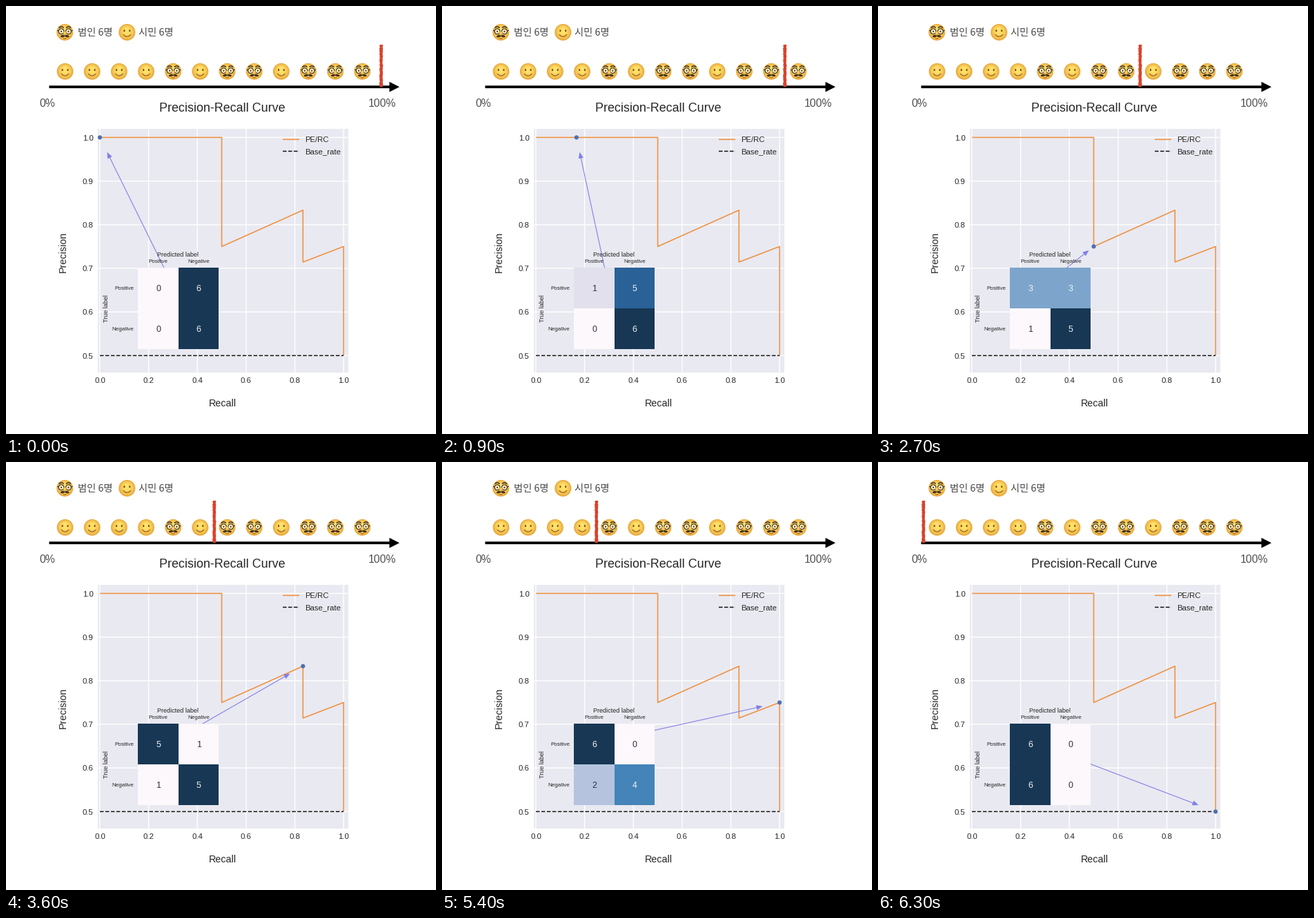
Recreate the animation shown at these times as a matplotlib script. Size 623 px wide and 620 px high, loop 7.2 s.

```python
import numpy as np
import matplotlib.pyplot as plt
from matplotlib.animation import FuncAnimation
from matplotlib.patches import Circle, Ellipse, Polygon, Rectangle

W, H, DPI = 623, 620, 100
PT = 72 / DPI
INK = "#262626"
SANS, HANGUL = "Liberation Sans", "Noto Sans CJK JP"

# True = culprit, False = citizen, sorted by score from 0% to 100%
FACES = [c == "C" for c in "SSSSCSCCSCCC"]
FACE_X, FACE_GAP, FACE_Y = 85.6, 39.15, 94.8
# number of faces left of the threshold, one entry per step
CUTS = [12, 11, 9, 8, 6, 5, 4, 0]
STEP_MS = 900

CELL_X, CELL_Y = (191, 250, 308.3), (379.3, 438, 496.5)
SHADES = np.array([
    (253, 248, 252), (226, 224, 236), (181, 195, 222), (125, 165, 203),
    (68, 132, 184), (42, 97, 150), (23, 55, 84)]) / 255

fig = plt.figure(figsize=(W / DPI, H / DPI), dpi=DPI, facecolor="white")
ax = fig.add_axes([0, 0, 1, 1])
ax.set_xlim(0, W)
ax.set_ylim(H, 0)
ax.axis("off")


def px(recall):
    return 136 + 353.1 * recall


def py(precision):
    return 190.4 + 632 * (1 - precision)


def label(x, y, text, size, ha="center", color=INK, font=SANS, z=6):
    """Text whose capitals are centred on y."""
    return ax.text(x, y + 0.36 * size, text, fontsize=size * PT, ha=ha,
                   va="baseline", color=color, family=font, zorder=z)


def side_label(x, y, text, size):
    ax.text(x, y, text, fontsize=size * PT, ha="center", va="center",
            rotation=90, color=INK, family=SANS, zorder=6)


def line(xs, ys, color, width, z, cap="butt", **kw):
    ax.plot(xs, ys, color=color, lw=width * PT, zorder=z, snap=False,
            solid_capstyle=cap, solid_joinstyle="round", **kw)


def dashed(xs, y):
    line(xs, (y, y), "#111111", 1.5, 4, dashes=(3.7, 1.6))


def oval(x, y, w, h, color, z=4, **kw):
    ax.add_patch(Ellipse((x, y), w, h, fc=color, lw=0, zorder=z, **kw))


def head(x, y, r):
    rim, core = np.array((232, 164, 56)), np.array((255, 224, 104))
    for t in np.linspace(0, 1, 9):
        color = (rim + (core - rim) * t ** 0.6) / 255
        ax.add_patch(Circle((x, y - 2.2 * t), r * (1 - 0.65 * t),
                            fc=color, lw=0, zorder=3))


def citizen(x, y, r):
    head(x, y, r)
    k = r / 12
    for side in (-1, 1):
        oval(x + side * 3.9 * k, y - 2.2 * k, 2.3 * k, 3.2 * k, "#75501c")
    u = np.linspace(-1, 1, 21)
    line(x + 5.4 * k * u, y + (3.4 + 2.9 * (1 - u ** 2)) * k, "#8a5a1c",
         1.15 * k, 4, cap="round")


def culprit(x, y, r):
    head(x, y, r)
    k = r / 12
    u = np.linspace(-1, 1, 15)
    for side in (-1, 1):
        cx = x + side * 5.2 * k
        line(cx + 3 * k * u, y - (6.7 + 1.3 * (1 - u ** 2)) * k, "#4a3a26",
             1.7 * k, 5, cap="round")
        ax.add_patch(Circle((cx, y - 1.2 * k), 3.9 * k, fc="#f8ebbd",
                            ec="#2f2822", lw=1.1 * k * PT, zorder=4))
        oval(cx, y - 1.1 * k, 1.9 * k, 2.6 * k, "#4f3818", 5)
        line((x + side * 9.1 * k, x + side * 11.2 * k),
             (y - 2 * k, y - 2.6 * k), "#2f2822", 1.1 * k, 4)
        oval(x + side * 3 * k, y + 5.6 * k, 6.8 * k, 3.4 * k, "#443422", 5,
             angle=side * 14)
    oval(x, y + 1.6 * k, 5 * k, 6.2 * k, "#e9a63c", 6)
    oval(x, y + 1.2 * k, 3.2 * k, 4.4 * k, "#f8cb62", 6)
    line(x + 2.4 * k * u, y + (8.5 + 0.7 * (1 - u ** 2)) * k, "#8a5a1c",
         0.9 * k, 5)


def draw_scale():
    culprit(85.3, 38, 12)
    citizen(175.3, 38, 12)
    for x, text in ((104, "범인 6명"), (192.5, "시민 6명")):
        label(x, 38, text, 14.3, "left", "#484848", HANGUL)
    for i, guilty in enumerate(FACES):
        (culprit if guilty else citizen)(FACE_X + FACE_GAP * i, FACE_Y, 11.9)
    line((62.5, 558), (117.2, 117.2), "black", 3.8, 2)
    ax.add_patch(Polygon([(555.5, 109.8), (570, 117.2), (555.5, 124.6)],
                         fc="black", lw=0, zorder=2))
    label(59.8, 140.3, "0%", 15.7, color="#505050")
    label(544.5, 140.3, "100%", 15.7, color="#505050")


def draw_chart():
    ax.add_patch(Rectangle((132.5, 178), 363, 353, fc="#e9e9f1", lw=0,
                           zorder=1))
    for v in np.arange(0, 1.01, 0.2):
        line((px(v), px(v)), (178, 531), "white", 1.4, 2)
        label(px(v), 541.8, f"{v:.1f}", 11.4)
    for v in np.arange(0.5, 1.01, 0.1):
        line((132.5, 495.5), (py(v), py(v)), "white", 1.4, 2)
        label(126.5, py(v), f"{v:.1f}", 11.4, "right")
    label(313.7, 146.7, "Precision-Recall Curve", 17.9)
    label(314, 574.7, "Recall", 14.4)
    side_label(83.2, 356.3, "Precision", 14.4)

    curve = np.array([(0, 1), (1 / 2, 1), (1 / 2, 3 / 4), (5 / 6, 5 / 6),
                      (5 / 6, 5 / 7), (1, 3 / 4), (1, 1 / 2)])
    line(px(curve[:, 0]), py(curve[:, 1]), "#ee9140", 1.6, 3)
    dashed((px(0), px(1)), py(0.5))
    line((401, 425), (193.3, 193.3), "#ee9140", 1.6, 3)
    dashed((401, 425), 210.4)
    label(433, 193.3, "PE/RC", 11.4, "left")
    label(433, 210, "Base_rate", 11.4, "left")


def draw_matrix_labels():
    label(249.2, 360, "Predicted label", 9)
    side_label(145.5, 438.2, "True label", 9)
    for i, text in enumerate(("Positive", "Negative")):
        label((220, 279)[i], 369.5, text, 8)
        label(185.2, (408.5, 467.3)[i], text, 8, "right")


def shade(t):
    stops = np.linspace(0, 1, len(SHADES))
    return [np.interp(t, stops, SHADES[:, c]) for c in range(3)]


def chalk_outline():
    rng = np.random.default_rng(4)
    ys = np.linspace(56, 117, 32)
    left = -2.3 + rng.uniform(-0.5, 0.5, ys.size)
    right = 2.3 + rng.uniform(-0.5, 0.5, ys.size)
    return np.column_stack([np.r_[left, right[::-1]], np.r_[ys, ys[::-1]]])


def arrow_shape(dot):
    """Thin arrow ending a tenth of the way short of the dot."""
    base = np.array((240.7 if dot[0] < 242 else 243.3,
                     403 if dot[1] < 408 else 413))
    way = base - dot
    tip = dot + 0.1 * way
    u = way / np.hypot(*way)
    n = np.array((-u[1], u[0]))
    neck = tip + 9 * u
    return [tip, neck + 3.6 * n, neck + 0.55 * n, base + 0.55 * n,
            base - 0.55 * n, neck - 0.55 * n, neck - 3.6 * n]


draw_scale()
draw_chart()
draw_matrix_labels()

chalk = chalk_outline()
bar = ax.add_patch(Polygon(chalk, fc="#d8432b", lw=0, zorder=8))
arrow = ax.add_patch(Polygon([(0, 0), (1, 0), (0, 1)], fc="#7f7fe8", lw=0,
                             zorder=4))
dot = ax.add_patch(Circle((0, 0), 3.1, fc="#4c72b0", lw=0, zorder=7))
cells, counts = [], []
for r in range(2):
    for c in range(2):
        x0, x1, y0, y1 = CELL_X[c], CELL_X[c + 1], CELL_Y[r], CELL_Y[r + 1]
        cells.append(ax.add_patch(Rectangle((x0, y0), x1 - x0, y1 - y0, lw=0,
                                            zorder=5)))
        counts.append(label((x0 + x1) / 2, (y0 + y1) / 2, "", 12.4))


def update(step):
    cut = CUTS[step]
    tp = sum(FACES[cut:])
    fp = len(FACES) - cut - tp
    values = (tp, 6 - tp, fp, 6 - fp)
    low, high = min(values), max(values)
    for cell, count, v in zip(cells, counts, values):
        t = (v - low) / (high - low)
        cell.set_facecolor(shade(t))
        count.set_text(str(v))
        count.set_color("#f4f4f8" if t >= 0.5 else "#2b3048")

    precision = tp / (tp + fp) if tp else 1
    point = np.array((px(tp / 6), py(precision)))
    dot.center = tuple(point)
    arrow.set_xy(arrow_shape(point))

    # the threshold sits at the axis ends or between two faces
    if cut == 0:
        x = 65.8
    elif cut == len(FACES):
        x = 543.5
    else:
        x = 67.7 + 39 * cut
    bar.set_xy(chalk + (x, 0))
    return [bar, arrow, dot, *cells, *counts]


anim = FuncAnimation(fig, update, frames=len(CUTS), interval=STEP_MS,
                     repeat=True, repeat_delay=0, blit=False)
plt.show()
```
